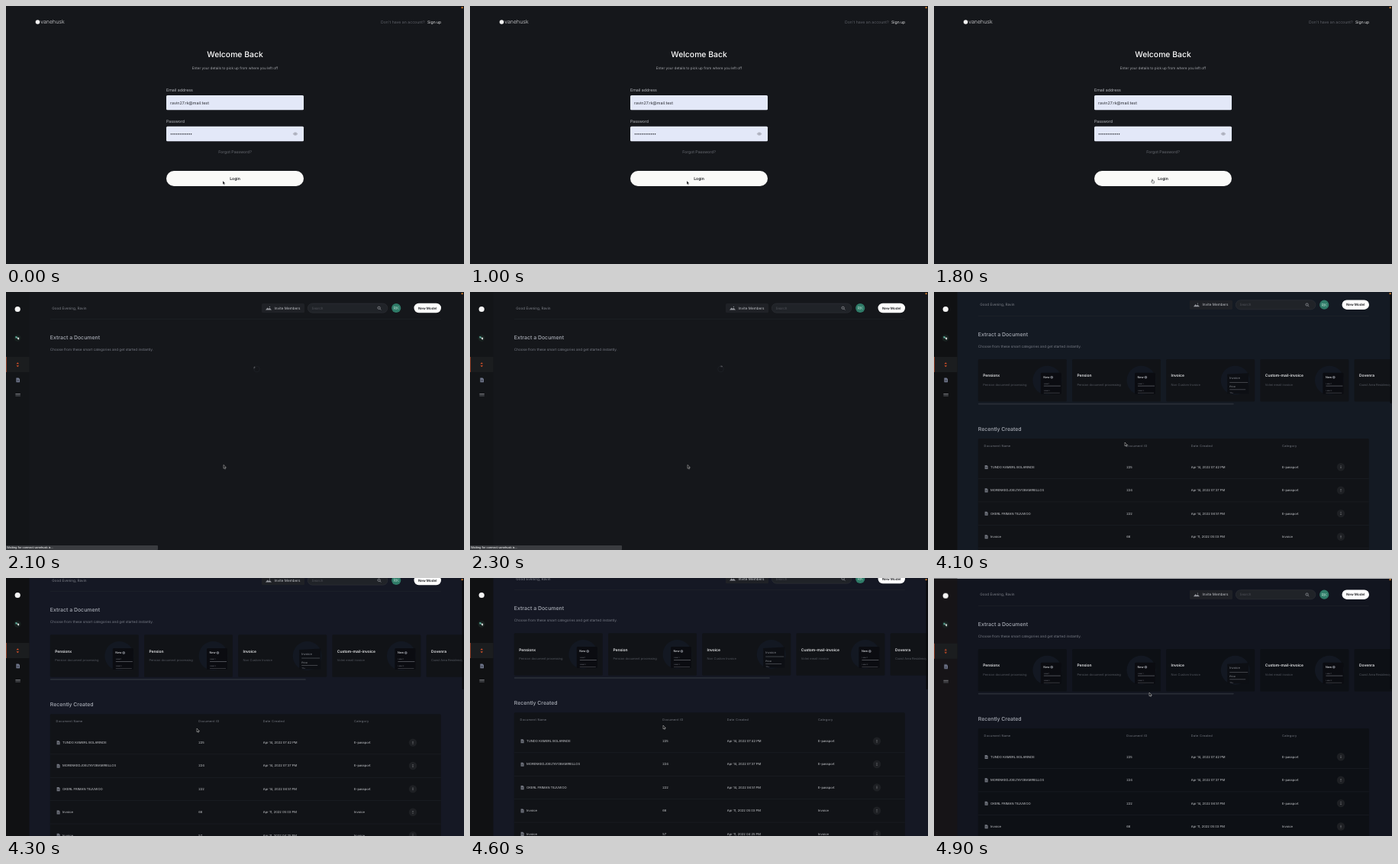
An HTML page that plays this animation: 600x338 px, repeating every 5000 ms.

```html
<!DOCTYPE html>
<html lang="en">
<head>
<meta charset="utf-8">
<title>Document dashboard</title>
<style>
html, body { margin: 0; width: 100%; height: 100%; overflow: hidden; background: #15171b; }
svg { display: block; width: 100vw; height: 100vh; }
text { font-family: Inter, "Open Sans", sans-serif; text-rendering: geometricPrecision; white-space: pre; }
.mid { text-anchor: middle; }
.med { font-weight: 500; }
.semi { font-weight: 600; }
.light { font-weight: 300; }
.head { letter-spacing: .32px; }

/* Everything changes in steps of 100 ms, which is 2% of the loop */
#login, #dash, #content, #wait, #page, #bounce, #bg, #side, #thumb, #cursor, #arrow, #hand, .panel {
  animation: 5s step-end infinite;
}
#login { animation-name: login; }
#dash { animation-name: dash; }
#content { animation-name: content; }
#wait { animation-name: wait; }
#page { animation-name: scroll; }
#bounce { animation-name: bounce; }
#bg { animation-name: bg; }
#side { animation-name: side; }
#thumb { animation-name: thumb; }
#cursor { animation-name: move; }
#arrow { animation-name: arrow; }
#hand { animation-name: hand; }
.panel { animation-name: panel; }
#spin { transform-origin: 328.5px 101px; animation: spin 1s linear infinite; }

@keyframes login { 0% { visibility: visible } 40%, 100% { visibility: hidden } }
@keyframes dash { 0% { opacity: 0 } 40%, 100% { opacity: 1 } }
@keyframes content { 0% { opacity: 0 } 52% { opacity: .6 } 54%, 100% { opacity: 1 } }
@keyframes wait { 0%, 52%, 100% { opacity: 0 } 40% { opacity: 1 } }
@keyframes thumb { 0% { opacity: 0 } 80%, 100% { opacity: 1 } }
@keyframes hand { 0%, 40%, 100% { opacity: 0 } 26% { opacity: 1 } }
@keyframes arrow { 0%, 40%, 100% { opacity: 1 } 26% { opacity: 0 } }
@keyframes spin { to { transform: rotate(360deg) } }
@keyframes bg {
  0% { fill: #15171b }
  52% { fill: #141a23 }
  84% { fill: #151824 }
  96%, 100% { fill: #12151f }
}
@keyframes side { 0% { fill: #131518 } 52% { fill: #101113 } 96%, 100% { fill: #161417 } }
@keyframes panel { 0% { fill: #111317 } 96%, 100% { fill: #0d1015 } }
@keyframes bounce { 0% { transform: none } 98%, 100% { transform: translateY(.7px) } }
@keyframes scroll {
  0% { transform: none }
  80% { transform: translateY(-1px) }
  82% { transform: translateY(-4.3px) }
  84% { transform: translateY(-11px) }
  86% { transform: translateY(-18px) }
  88% { transform: translateY(-23px) }
  90% { transform: translateY(-25px) }
  92% { transform: translateY(-20px) }
  94% { transform: translateY(-10px) }
  96% { transform: translateY(-2px) }
  98%, 100% { transform: none }
}
@keyframes move {
  0% { transform: translate(284px, 229px) }
  26% { transform: translate(284.4px, 228px) }
  28% { transform: translate(284.8px, 227px) }
  30% { transform: translate(285px, 226.4px) }
  52% { transform: translate(281px, 218px) }
  54% { transform: translate(271px, 197px) }
  56% { transform: translate(258px, 168px) }
  58% { transform: translate(249px, 147px) }
  60% { transform: translate(244px, 137px) }
  62% { transform: translate(242.8px, 134px) }
  74% { transform: translate(247px, 170px) }
  76% { transform: translate(250px, 197px) }
  92% { transform: translate(253px, 193px) }
  94% { transform: translate(264px, 178px) }
  96% { transform: translate(276px, 160px) }
  98%, 100% { transform: translate(282px, 150px) }
}
</style>
</head>
<body>
<svg id="stage" viewBox="0 0 600 338"></svg>
<script>
// y is the middle of the capital letters
const text = (x, y, size, fill, str, cls = "") =>
  `<text x="${x}" y="${y + size * .36}" font-size="${size}" fill="${fill}" class="${cls}">${str}</text>`;
const rect = (x, y, w, h, fill, r = 0, more = "") =>
  `<rect x="${x}" y="${y}" width="${w}" height="${h}" rx="${r}" fill="${fill}" ${more}/>`;
const dot = (x, y, r, fill) =>
  `<circle cx="${x}" cy="${y}" r="${r}" fill="${fill}"/>`;
const ring = (x, y, r, stroke, w) =>
  `<circle cx="${x}" cy="${y}" r="${r}" fill="none" stroke="${stroke}" stroke-width="${w}"/>`;
const path = (d, fill, stroke = "none", w = 0) =>
  `<path d="${d}" fill="${fill}" stroke="${stroke}" stroke-width="${w}"/>`;
const group = (id, ...parts) => `<g id="${id}">${parts.join("")}</g>`;
const times = (n, fn) => Array.from({ length: n }, (_, i) => fn(i)).join("");

const docIcon = (x, y, s, fill) =>
  `<g transform="translate(${x} ${y}) scale(${s})">` +
  path("M-2-2.7H.8L2.2-1.3V2.7H-2Z", fill) +
  path("M-1-.3H1.2M-1 1H1.2", "none", "#15171b", .5) + "</g>";

const login = () => group("login",
  rect(0, 0, 600, 338, "#15171b"),
  dot(41.5, 21, 2.8, "#f4f4f4"),
  text(45.2, 20.6, 7, "#dcdde0", "vanehusk", "light"),
  text(491, 21, 5.2, "#5c5f66", "Don't have an account?"),
  text(552, 21, 5.1, "#e6e7e9", "Sign up"),
  text(300, 63.5, 10.4, "#fff", "Welcome Back", "mid med"),
  text(300, 81.4, 4.65, "#a4a6ab", "Enter your details to pick up from where you left off", "mid"),
  text(210, 109.7, 5.3, "#b9bbc0", "Email address"),
  rect(210, 117, 180, 19.3, "#e3e8f8", 1.5),
  text(215, 126.7, 5.35, "#2a2c33", "ravin27.rk@mail.test"),
  text(210, 150.7, 5.2, "#b9bbc0", "Password"),
  rect(210, 157.7, 180, 19.6, "#e3e8f8", 1.5),
  times(12, i => dot(216.4 + i * 2.38, 167.8, .8, "#25272e")),
  path("M375.6 167.5Q379 162.8 382.4 167.5Q379 172.2 375.6 167.5Z", "#b7bac6"),
  dot(379, 167.5, 1, "#a6aaba"),
  text(300, 191.3, 5.15, "#6a6d74", "Forgot Password?", "mid"),
  rect(210, 216, 180, 20, "#fafaf8", 10),
  text(300, 225.8, 5.1, "#17181c", "Login", "mid semi"));

const sidebar = () => [
  rect(0, 0, 30.5, 338, "#131518", 0, 'id="side"'),
  dot(15.2, 22.5, 3.6, "#f4f4f4"),
  dot(15, 60.3, 4.6, "#18201f"),
  path("M12 58.4L14.3 58L14.8 60.2L13 60.8Z", "#5fb3a0"),
  path("M14.6 59.4L17.2 59.8L17 62.6L15.4 62Z", "#d5dad8"),
  rect(0, 85, 30.5, 20, "#1b1d1f"),
  rect(0, 85, .6, 20, "#d8522a"),
  path("M13.5 94.2L15.3 92.2L17.1 94.2ZM13.5 96.2L15.3 98.2L17.1 96.2Z", "#d8522a"),
  docIcon(15.6, 115.4, 1.1, "#737a90"),
  rect(12.4, 133.2, 6.4, 1.1, "#85878d"),
  rect(12.4, 135.4, 6.4, 1.1, "#55575d")
].join("");

const header = () => [
  text(60.3, 21, 4.65, "#7f828a", "Good Evening, Ravin"),
  rect(57.8, 35.4, 512, .5, "#23262c"),
  rect(335, 15, 56, 12.3, "#1f2126", 1.5),
  path("M340 23.6L342.6 20.4L344 22L345.4 20.8L348 23.6Z", "#96989e"),
  dot(345.4, 19.4, .6, "#96989e"),
  text(351.6, 20.9, 4.65, "#c3c5ca", "Invite Members"),
  rect(395.3, 15, 104.6, 12.2, "#202328", 6.1, 'stroke="#34373d" stroke-width=".5"'),
  text(400.5, 21.1, 4.5, "#50535a", "Search"),
  ring(488.6, 20.8, 1.6, "#b5b7bc", .6),
  path("M489.8 22L491.3 23.5", "none", "#b5b7bc", .6),
  dot(511.2, 21, 6.1, "#2f7b68"),
  text(511.2, 21.1, 5.6, "#a9d0c4", "RK", "mid"),
  rect(534.5, 14.8, 35.5, 12.4, "#fff", 6.2),
  text(552.2, 20.9, 4.5, "#17181c", "New Model", "mid semi"),
  text(57.8, 59.6, 6.95, "#a9adb6", "Extract a Document", "med"),
  text(57.8, 75.6, 4.63, "#7a7e88", "Choose from these smart categories and get started instantly.")
].join("");

const newForm = x => [
  rect(x + 82, 110, 27, 28, "#0b0c11", 1.5),
  text(x + 85.5, 116, 3.8, "#d6d8dc", "New", "med"),
  dot(x + 96.4, 116, 1.8, "#858891"),
  path(`M${x + 95.4} 116h2M${x + 96.4} 115v2`, "none", "#0b0c11", .4),
  text(x + 86, 124.3, 2.3, "#72757d", "Label 1"),
  rect(x + 86, 127.1, 22, .5, "#8d9097"),
  text(x + 86, 133, 2.3, "#72757d", "Label 2"),
  rect(x + 86, 136.2, 21, .4, "#70737a")
].join("");

const invoiceForm = x => [
  path(`M${x + 80} 112l28-1.5v27h-28Z`, "#0d0f14"),
  text(x + 83, 117.2, 4, "#8d9098", "Invoice"),
  rect(x + 83, 122.8, 24, .4, "#8d9097"),
  text(x + 83, 128.6, 3.2, "#a5a8ae", "Price"),
  rect(x + 83, 132, 21, .4, "#8d9097"),
  text(x + 83, 136.5, 2.6, "#72757d", "Thu")
].join("");

const cards = [
  ["Pensionx", "Pension document processing"],
  ["Pension", "Pension document processing"],
  ["Invoice", "Non Custom Invoice"],
  ["Custom-mail-invoice", "Volmi email invoice"],
  ["Dovenra", "Coast Area Residency"]
];
const card = ([title, note], i) => {
  const x = 57.8 + i * 123.2;
  return rect(x, 92.2, 116, 55.6, "#111317", 1.5, 'class="panel"') +
    dot(x + 90.5, 120, 19, "#131822") +
    (title === "Invoice" ? invoiceForm(x) : newForm(x)) +
    text(x + 6.4, 113.9, 4.95, "#e9eaec", title, "semi") +
    text(x + 6.4, 125.8, 4, "#555961", note);
};

const columns = [65.5, 252.3, 336.8, 456];
const rows = [
  ["TUNDO KAMERL BOLARINDE", 225, "14, 2022 07:42", "E-passport"],
  ["MORENKEDJOELTAYOBAMIRELLOS", 224, "14, 2022 07:37", "E-passport"],
  ["OKERL FRIMAN TEJUWOO", 222, "14, 2022 06:51", "E-passport"],
  ["Invoice", 66, "11, 2022 05:03", "Invoice"],
  ["Invoice", 57, "11, 2022 04:25", "Invoice"]
];
const row = ([name, id, date, kind], i) => {
  const y = 233.6 + i * 30.4;
  const cells = [name, id, `Apr ${date} PM`, kind];
  return rect(57.8, y + 15, 512, .5, "#1f2328") +
    docIcon(68.5, y + .2, .95, "#757983") +
    cells.map((c, k) => text(k ? columns[k] : 74, y, 4.15, "#c8cace", c)).join("") +
    dot(533, y, 5.2, "#1e2024") +
    times(3, k => dot(533, y - 1.4 + k * 1.4, .42, "#e4e5e8"));
};

const content = () => group("content",
  cards.map(card).join(""),
  rect(57.8, 150, 335, 1.8, "#282d36", .9),
  text(57.8, 183.9, 6.9, "#a9adb6", "Recently Created", "med"),
  rect(57.8, 196.3, 512, 200, "#111317", 1.5, 'class="panel"'),
  ["Document Name", "Document ID", "Date Created", "Category"]
    .map((h, k) => text(columns[k], 206, 3.9, "#7b7f88", h, "head")).join(""),
  rows.map(row).join(""));

const wait = () => group("wait",
  ring(328.5, 101, 3.8, "#25282e", .5),
  group("spin", path("M325 102.4A3.8 3.8 0 0 1 324.8 100", "none", "#b5b7bc", .6)),
  rect(0, 332, 199, 6, "#3a3c40", 1),
  text(1, 334.9, 3.75, "#eceded", "Waiting for connect.vanehusk.is...", "med"));

const cursor = () => group("cursor",
  group("arrow", path("M0 0V4.8L1.1 3.8L1.8 5.4L2.6 5L1.9 3.5H3.4Z", "#08090b", "#e6e6e6", .45)),
  group("hand", path("M.6 1Q1.1.3 1.5 1V2.6L3.2 3Q3.7 3.2 3.6 3.9L3.2 5.7H1.1L-.5 3.8Q-.5 3.1.6 3.6Z",
    "#fff", "#17181c", .55)));

document.getElementById("stage").innerHTML =
  login() +
  group("dash",
    rect(0, 0, 600, 338, "#fff"),
    group("bounce",
      rect(0, 0, 600, 340, "#15171b", 0, 'id="bg"'),
      group("page", header(), content()),
      sidebar(),
      wait()),
    rect(597.6, 2, 2, 144, "#08090b", 1, 'id="thumb"')) +
  dot(597.6, 2.2, 1.1, "#d9822b") +
  cursor();
</script>
</body>
</html>
```
